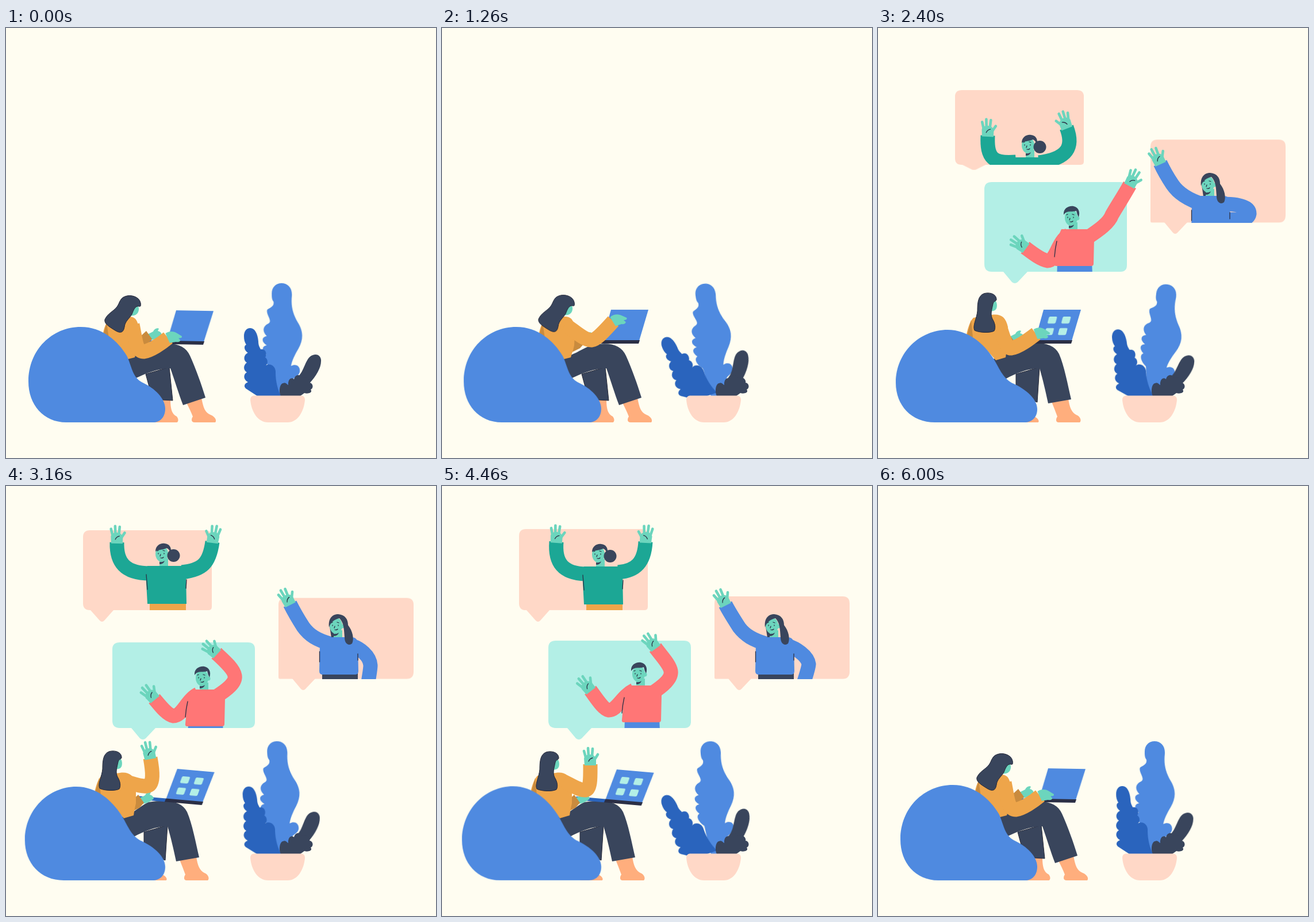
Write an HTML page without scripts that moves like this. It is 748 px wide and 748 px high and loops after 6.03 s.

```html
<!DOCTYPE html>
<html lang="en">
<head>
<meta charset="utf-8">
<title>Video call</title>
<style>
html, body { margin: 0; width: 100%; height: 100%; overflow: hidden; background: #fffdf1; }
svg { display: block; width: 100%; height: 100%; }

.blue { fill: #4f8ae0; }
.deep { fill: #2a64bd; }
.navy { fill: #39455c; }
.amber { fill: #eea54a; }
.rust { fill: #c98b3e; }
.peach { fill: #ffae7d; }
.skin { fill: #6cd5bd; }
.pink { fill: #ffd8c7; }
.mint { fill: #b3efe6; }
.coral { fill: #ff7676; }
.green { fill: #1ca795; }
.sleeve { fill: none; stroke-width: 25; }
.line { fill: none; stroke: #2b3145; stroke-width: 1.3; stroke-linecap: round; }

/* everything but the plant runs on the full loop */
.pose, .wave, .body, .box, .rise, .pop, .bag, .lap, .head, .far, .tap, .arm, .tiles, .nub {
  animation: 6030ms ease-in-out infinite;
}

/* seated pose a and upright pose b */
.pose { animation-name: pose; }
@keyframes pose {
  0%, 22%, 98.5%, 100% { d: var(--a); }
  32%, 89% { d: var(--b); }
}

/* callers: a arriving, b and c waving, d late */
.wave { animation-name: wave; }
@keyframes wave {
  0%, 39.8% { d: var(--a); }
  49%, 52.4%, 63% { d: var(--b); }
  57.5%, 68%, 74% { d: var(--c); }
  86.2%, 100% { d: var(--d); }
}
.body { animation-name: body; }
@keyframes body {
  0%, 39.8% { transform: translate(var(--a)); }
  49%, 52.4%, 63% { transform: translate(0, 0); }
  57.5%, 68%, 74% { transform: translate(var(--c)); }
  86.2%, 100% { transform: translate(var(--d)); }
}
.box { animation-name: box; }
@keyframes box {
  0%, 39.8% { transform: scaleY(var(--a)); }
  49%, 52.4%, 63% { transform: scaleY(var(--b)); }
  57.5%, 68%, 74% { transform: scaleY(var(--c)); }
  86.2%, 100% { transform: scaleY(var(--d)); }
}
.rise { animation-name: rise; }
@keyframes rise {
  0%, 32% { transform: translateY(150px); }
  39%, 87% { transform: translateY(0); }
  94% { transform: translateY(-12px); }
  98.5%, 100% { transform: translateY(60px); }
}
.nub { animation-name: nub; transform-origin: 167px 216px; }
@keyframes nub {
  0%, 39.8% { transform: scaleY(.45); }
  46%, 100% { transform: none; }
}
.p1 { animation-name: pop1; transform-origin: 167px 236px; }
.p2 { animation-name: pop2; transform-origin: 238px 441px; }
.p3 { animation-name: pop3; transform-origin: 517px 355px; }
@keyframes pop1 {
  0%, 32% { transform: translateY(30px) scale(0); }
  37.5% { transform: translateY(24px) scale(1, .75); }
  39.8% { transform: translateY(22px) scale(1); }
  46%, 93% { transform: translateY(0) scale(1); }
  98.3%, 100% { transform: translateY(0) scale(0); }
}
@keyframes pop2 {
  0%, 27% { transform: translateY(0) scale(0); }
  31.5% { transform: translateY(0) scale(.85, .65); }
  36%, 39.8% { transform: translateY(3px) scale(1); }
  46%, 93% { transform: translateY(0) scale(1); }
  98.3%, 100% { transform: translateY(0) scale(0); }
}
@keyframes pop3 {
  0%, 29% { transform: translateY(0) scale(0); }
  31.5% { transform: translateY(0) scale(.47, .2); }
  37%, 39.8% { transform: translateY(3px) scale(1); }
  46%, 93% { transform: translateY(0) scale(1); }
  98.3%, 100% { transform: translateY(0) scale(0); }
}

.bag { animation-name: bag; transform-origin: 277px 686px; }
@keyframes bag {
  0%, 100% { transform: none; }
  8%, 21% { transform: scale(1.005, 1); }
  38%, 41% { transform: scale(1.034, .97); }
  52.4% { transform: scale(1.026, .982); }
  74%, 87% { transform: scale(1.018, .986); }
}
.lap { animation-name: lap; transform-origin: 285px 547px; }
@keyframes lap {
  0%, 100% { transform: translate(1px, 1px) rotate(1deg); }
  12%, 22% { transform: translate(0, 0) rotate(0deg); }
  32%, 41% { transform: translate(-6px, 0) rotate(0deg); }
  48%, 53% { transform: translate(-1px, 1px) rotate(5deg); }
  74% { transform: translate(5px, 2px) rotate(5deg); }
  82%, 90% { transform: translate(0, 0) rotate(0deg); }
}
.tiles { animation-name: tiles; transform-origin: 318px 518px; }
@keyframes tiles {
  0%, 23%, 97%, 100% { transform: scale(0); }
  28%, 92% { transform: scale(1); }
}
.head { animation-name: head; }
@keyframes head {
  0%, 32%, 40%, 86%, 100% { transform: translate(0, 0); }
  20% { transform: translate(-4px, -1px); }
  52.4% { transform: translate(-5px, 0); }
  74% { transform: translate(-3px, 1px); }
}
.far { animation-name: far; }
@keyframes far {
  0%, 11%, 98%, 100% { transform: translate(0, 0); }
  17%, 22% { transform: translate(-6px, 7px); }
  32%, 41% { transform: translate(-17px, 4px); }
  48%, 74% { transform: translate(-14px, 10px); }
  82%, 90% { transform: translate(-11px, 5px); }
}
.tap { animation-name: tap; }
@keyframes tap {
  0%, 4%, 8%, 12%, 80%, 86%, 91%, 100% { transform: none; }
  2%, 6%, 10%, 83%, 88.5% { transform: translateY(-2px); }
}
.arm { stroke: #eea54a; animation-name: arm, typing; }
.arm.up { animation-name: arm, waving; }
@keyframes arm {
  0%, 11%, 98.5%, 100% { d: path("M220 516C226 545 226 563 240 563C252 561 270 549 282 539"); }
  17%, 22% { d: path("M214 516C228 524 246 543 260 543C270 542 285 524 298 510"); }
  30%, 41% { d: path("M210 514C218 535 222 558 232 557C245 555 262 542 275 532"); }
  48%, 52.4%, 62%, 69% { d: path("M208 514C225 519 235 523 245 522C258 520 255 495 251 473"); }
  57%, 66%, 74% { d: path("M212 514C225 520 240 530 250 529C259 527 258 505 258 484"); }
  82%, 90% { d: path("M212 515C225 530 228 553 242 552C255 551 275 543 288 538"); }
}
@keyframes typing {
  0%, 44%, 78.01%, 100% { opacity: 1; }
  44.01%, 78% { opacity: 0; }
}
@keyframes waving {
  0%, 44%, 78.01%, 100% { opacity: 0; }
  44.01%, 78% { opacity: 1; }
}

/* leaves swing two full times per loop, each with its own lag */
.leaf { animation: sway 1507.5ms cubic-bezier(.37, 0, .63, 1) var(--lag) infinite alternate; }
@keyframes sway {
  from { transform: rotate(var(--r)); }
  to { transform: rotate(var(--l)); }
}
</style>
</head>
<body>
<svg viewBox="0 0 748 748">
  <defs>
    <g id="hand">
      <path class="skin" d="M-10 2L-11 -10Q-10 -17 0 -17Q9 -16 10 -8L10 2Z"/>
      <path d="M-8 -12L-11 -23M-3 -14L-4 -28M3 -14L4 -27M8 -9L13 -17" fill="none" stroke="#6cd5bd" stroke-width="4.6" stroke-linecap="round"/>
      <path class="line" d="M-3 -5Q-1 -10 4 -11"/>
    </g>
    <marker id="open" markerUnits="userSpaceOnUse" markerWidth="1" markerHeight="1" orient="auto" overflow="visible">
      <use href="#hand" transform="rotate(90)"/>
    </marker>
    <marker id="flip" markerUnits="userSpaceOnUse" markerWidth="1" markerHeight="1" orient="auto" overflow="visible">
      <use href="#hand" transform="rotate(90) scale(-1 1)"/>
    </marker>
    <marker id="flat" markerUnits="userSpaceOnUse" markerWidth="1" markerHeight="1" orient="auto" overflow="visible">
      <path class="skin" transform="rotate(35)" d="M-4 -8C4 -13 13 -10 17 -6L24 -1Q25 3 18 2L21 6Q19 10 13 8L2 9Z"/>
    </marker>
    <g id="face">
      <path class="skin" d="M-4 8H11V28H-4Z"/>
      <ellipse class="skin" rx="11" ry="14"/>
      <path class="navy" d="M-4 14Q1 15 5 12Q3 18 -4 18Z"/>
      <circle class="skin" cx="11" cy="1" r="3.5"/>
      <path class="line" d="M-6 -1V0M4 -1V0M-2 1L-3 4M-2 7Q1 8 3 6M-8 -5L-6 -6M2 -6L5 -5"/>
    </g>
    <clipPath id="c1"><path d="M0 -80H748V216H0Z"/></clipPath>
    <clipPath id="c2"><path d="M0 -80H748V421H0Z"/></clipPath>
    <clipPath id="c3"><path d="M0 -80H748V335.500H0Z"/></clipPath>
  </defs>

  <!-- plant -->
  <g>
    <path class="leaf blue" style="--r:6.8deg;--l:-10.2deg;--lag:-670ms;transform-origin:475px 640px" d="M463 462C463 451 470 444 480 444C491 444 499 452 498 466C496 485 500 498 508 512C518 528 518 542 509 558C502 570 498 578 496 588C506 583 513 590 511 599C509 606 500 608 499 612L492 642H468L460 590C450 582 446 572 453 568C444 560 446 553 454 552C444 546 445 537 454 536C445 527 448 518 457 514C465 509 452 498 455 490C458 487 468 485 466 476C463 472 463 468 463 462Z"/>
    <path class="leaf deep" style="--r:.4deg;--l:-19deg;--lag:-145ms;transform-origin:455px 640px" d="M414 536C414 528 418 522 425 522C433 522 438 532 439 545C439 553 442 556 443 559C451 557 455 566 451 573C456 576 456 584 452 587C460 582 470 589 469 600C469 615 473 630 479 642H440L417 627C413 623 415 618 421 616C412 611 413 602 419 599C412 595 413 586 419 582C411 577 415 567 421 565C413 560 414 552 418 551C415 546 414 542 414 536Z"/>
    <path class="leaf navy" style="--r:2.8deg;--l:-14deg;--lag:-405ms;transform-origin:500px 640px" d="M524 578C530 566 546 564 548 577C549 590 540 605 528 618L505 632L500 612C515 605 517 590 524 578Z"/>
    <path class="navy" d="M478 640C474 634 476 618 482 618C486 615 490 621 491 621C490 612 496 606 501 611C503 602 512 602 514 608C522 604 530 612 528 617C535 618 535 627 530 629C534 634 526 637 519 635L512 640Z"/>
    <path class="pink" d="M431 639.500H514Q520 640 520 647C518 668 507 686 490 686H456C438 686 427 668 425 647Q425 640 431 639.500Z"/>
  </g>

  <!-- pink bubble, left -->
  <g class="pop p1">
    <path class="nub pink" d="M147 215H187V216L171 234Q167 238 163 234L147 216Z"/>
    <path class="box pink" style="--a:.935;--b:1;--c:1.015;--d:.972;transform-origin:0 216px" d="M146 77H346Q358 77 358 89V210Q358 216 352 216H146Q134 216 134 204V89Q134 77 146 77Z"/>
    <g clip-path="url(#c1)"><g class="rise">
      <g stroke="#1ca795">
        <path class="sleeve wave" marker-end="url(#open)" style="--a:path('M240 211C200 214 189 205 191 165');--b:path('M250 152C206 152 192 132 193 98');--c:path('M250 153C210 152 196 133 199 97');--d:path('M250 154C210 154 200 140 193 100')"/>
        <path class="sleeve wave" marker-end="url(#flip)" style="--a:path('M280 212C330 205 341 185 328 151');--b:path('M306 150C342 146 354 134 359 97');--c:path('M306 150C338 148 352 132 354 97');--d:path('M306 154C344 152 360 137 370 104')"/>
      </g>
      <g class="body" style="--a:-10px,64px;--c:1px,1px;--d:3px,3px">
        <use href="#face" x="271" y="118"/>
        <circle class="navy" cx="291.500" cy="121" r="11"/>
        <path class="navy" d="M260 114C260 104 268 99 276 100C284 101 288 106 287 116C284 112 283 109 279 108C272 112 264 110 260 114Z"/>
        <path class="amber" d="M250 200H313V250H250Z"/>
        <path class="green" d="M246 139H308Q314 139 313 150L314 205H246L243 150Z"/>
        <path class="line" d="M244 154L246 180M314 163L313 178"/>
      </g>
    </g></g>
  </g>

  <!-- pink bubble, right -->
  <g class="pop p3">
    <path class="pink" d="M498 334H538V335L521 353Q517 357 513 353L498 335Z"/>
    <path class="box pink" style="--a:1.02;--b:.995;--c:1.014;--d:.98;transform-origin:0 335.500px" d="M486 194H697Q709 194 709 206V323Q709 335.500 697 335.500H476Q474 335.500 474 333V206Q474 194 486 194Z"/>
    <g clip-path="url(#c3)"><g class="rise">
      <g stroke="#4f8ae0">
        <path class="sleeve wave" marker-end="url(#open)" style="--a:path('M566 304C540 296 522 284 512 269C504 257 497 245 491 232');--b:path('M566 275C540 268 527 259 517 245C508 231 500 217 494 205');--c:path('M566 275C540 268 527 259 517 246C508 232 499 218 493 206');--d:path('M562 279C535 271 518 264 508 250C500 238 492 225 486 212')"/>
        <path class="sleeve wave" marker-end="url(#flat)" style="--a:path('M600 303C620 303 646 306 646 320C644 332 625 330 603 330');--b:path('M602 278C615 282 633 295 634 312C634 320 631 332 629 350');--c:path('M602 278C615 282 636 295 638 310C637 320 632 332 627 350');--d:path('M597 279C611 283 629 296 631 312C631 320 629 332 628 350')"/>
      </g>
      <g class="body" style="--a:0px,26px;--c:0px,0px;--d:-5px,1px">
        <path class="navy" d="M563 244L566 264L575 262V240Z"/>
        <use href="#face" x="574" y="243"/>
        <path class="navy" d="M550 325H612V390H550Z"/>
        <path class="blue" d="M556 263H602Q612 264 612 274L613 322Q613 328 607 328H551Q545 328 545 322L546 272Z"/>
        <path class="navy" d="M562 246C560 230 568 223 578 223C590 224 595 232 595 242C603 252 606 266 602 274C596 279 589 274 589 264C588 250 588 238 580 230C572 232 565 236 562 246Z"/>
        <path class="line" d="M545.500 288V306M612 292V303"/>
      </g>
    </g></g>
  </g>

  <!-- mint bubble -->
  <g class="pop p2">
    <path class="mint" d="M218 420H260V421L243 439Q238 443 233 439L218 421Z"/>
    <path class="box mint" style="--a:1.04;--b:.993;--c:1.013;--d:1.015;transform-origin:0 421px" d="M198 271H421Q433 271 433 283V410Q433 421 422 421H198Q185 421 185 408V283Q185 271 198 271Z"/>
    <g clip-path="url(#c2)"><g class="rise">
      <g stroke="#ff7676">
        <path class="sleeve wave" marker-end="url(#open)" style="--a:path('M332 357C312 368 310 402 295 402C283 400 268 388 256 379');--b:path('M334 362C314 372 307 400 291 400C280 398 268 382 258 370');--c:path('M334 355C312 366 305 390 290 390C280 388 268 368 258 355');--d:path('M332 358C312 368 303 396 288 396C275 394 262 382 250 370')"/>
        <path class="sleeve wave" marker-end="url(#open)" style="--a:path('M364 362C385 348 402 336 407 322C415 308 428 288 438 270');--b:path('M366 366C385 354 400 342 398 330C396 318 380 304 366 291');--c:path('M366 360C384 348 400 335 398 322C396 310 382 296 371 281');--d:path('M366 362C382 348 395 335 393 320C390 305 378 290 369 276')"/>
      </g>
      <g class="body" style="--a:-5px,-7px;--c:1px,-7px;--d:-2px,-4px">
        <use href="#face" x="341" y="334"/>
        <path class="navy" d="M328 329C327 318 336 313 345 314C354 316 357 324 354 333C352 330 351 326 350 322C343 325 334 320 328 329Z"/>
        <path class="blue" d="M317 410H377L380 480H315Z"/>
        <path class="coral" d="M324 354H370Q381 354 381 370L380 414Q380 418 376 418H315Q311 418 312 413L316 372Z"/>
        <path class="line" d="M316 375Q313 388 312 402"/>
      </g>
    </g></g>
  </g>

  <!-- woman -->
  <g>
    <path class="pose peach" style="--a:path('M274 646L286 647C286 665 290 672 296 675C301 679 300 686 297 686L255 686L262 665Z');--b:path('M255 640L262 645C262 660 268 674 274 677C280 680 281 686 278 686L240 686L250 665Z')"/>
    <path class="pose navy" stroke="#252838" style="--a:path('M243 602L284 590L290 648L255 646Z');--b:path('M240 602L281 590L277 651L240 638Z')"/>
    <path class="pose peach" style="--a:path('M314 652L340 643C343 660 346 669 356 673C364 676 367 683 364 686L328 686C322 686 322 680 325 676C322 668 318 660 314 652Z');--b:path('M302 650L331 644C333 660 337 669 345 673C353 676 354 684 351 686L314 686C309 686 309 680 312 676C309 668 306 660 302 650Z')"/>
    <path class="pose navy" style="--a:path('M208 573C230 570 242 558 260 552C292 545 312 552 320 570C330 592 340 620 347 643L308 656C300 635 294 615 286 592C265 592 245 600 226 609L208 590Z');--b:path('M198 576C218 574 230 558 248 550C282 545 305 548 315 567C324 588 330 620 336 646L296 653C291 630 287 612 281 592C262 592 240 600 221 611L198 590Z')"/>

    <g class="lap">
      <path class="deep" d="M228 543H282V549H228Z"/>
      <path class="blue" d="M294 490H359L343 544H279Z"/>
      <path fill="#2b2f45" d="M279 543H344L342 549H277Z"/>
      <g class="tiles mint">
        <g transform="translate(318 518) skewX(-15)">
          <rect x="-18.500" y="-16" width="14" height="12" rx="2"/>
          <rect x="5.500" y="-16" width="14" height="12" rx="2"/>
          <rect x="-18.500" y="4" width="14" height="12" rx="2"/>
          <rect x="5" y="4" width="14" height="12" rx="2"/>
        </g>
      </g>
    </g>

    <g class="far">
      <path class="skin" d="M246 533L256 528C258 523 264 521 266 523L264 527Q270 528 271 534Q262 542 251 543Z"/>
      <path class="rust" d="M230 540L244 527L254 541L246 550L230 558Z"/>
    </g>

    <path class="pose amber" style="--a:path('M168 536C170 522 174 512 180 507L212 502C226 501 231 510 231 530L230 552C229 558 226 566 224 573L212 576C200 560 185 545 168 536Z');--b:path('M154 533C157 520 160 510 166 504L198 499C213 497 222 502 226 520L226 552C224 560 223 566 222 573L205 578C190 560 175 545 154 533Z')"/>
    <path class="pose rust" style="--a:path('M169 535L175 512L179 540Z');--b:path('M155 534L162 508L165 538Z')"/>
    <g class="tap">
      <path class="sleeve arm" marker-end="url(#flat)"/>
      <path class="sleeve arm up" marker-end="url(#open)"/>
    </g>

    <g class="head">
      <path class="pose skin" style="--a:path('M228 482C233 486 231 494 228 497C224 501 219 501 215 500L222 484Z');--b:path('M200 472C207 474 208 482 206 488C203 493 198 493 195 492L195 475Z')"/>
      <path class="pose navy" stroke="#252838" style="--a:path('M207 467C216 463 232 467 234 478C235 484 234 485 231 484C225 483 222 490 219 498C215 505 207 510 206 520C204 532 197 531 188 525C180 520 170 514 172 507C177 496 187 493 193 485C198 478 198 470 207 467Z');--b:path('M184 462C193 459 205 462 206 471C207 476 201 474 200 480C198 490 195 498 199 506C204 514 205 522 202 527C195 531 175 530 168 526C164 518 172 505 173 492C173 478 174 466 184 462Z')"/>
    </g>

    <g class="bag">
      <path class="pose blue" style="--a:path('M105 686C65 686 39 655 39 615C39 560 80 520 130 520C168 520 195 545 210 570C219 588 219 606 236 616C260 627 277 645 277 662C277 678 267 686 256 686Z');--b:path('M105 686C65 686 39 655 39 615C39 560 80 520 126 520C161 520 187 545 203 571C213 588 218 605 234 615C260 627 277 645 277 662C277 678 267 686 256 686Z')"/>
    </g>
  </g>
</svg>
</body>
</html>
```
